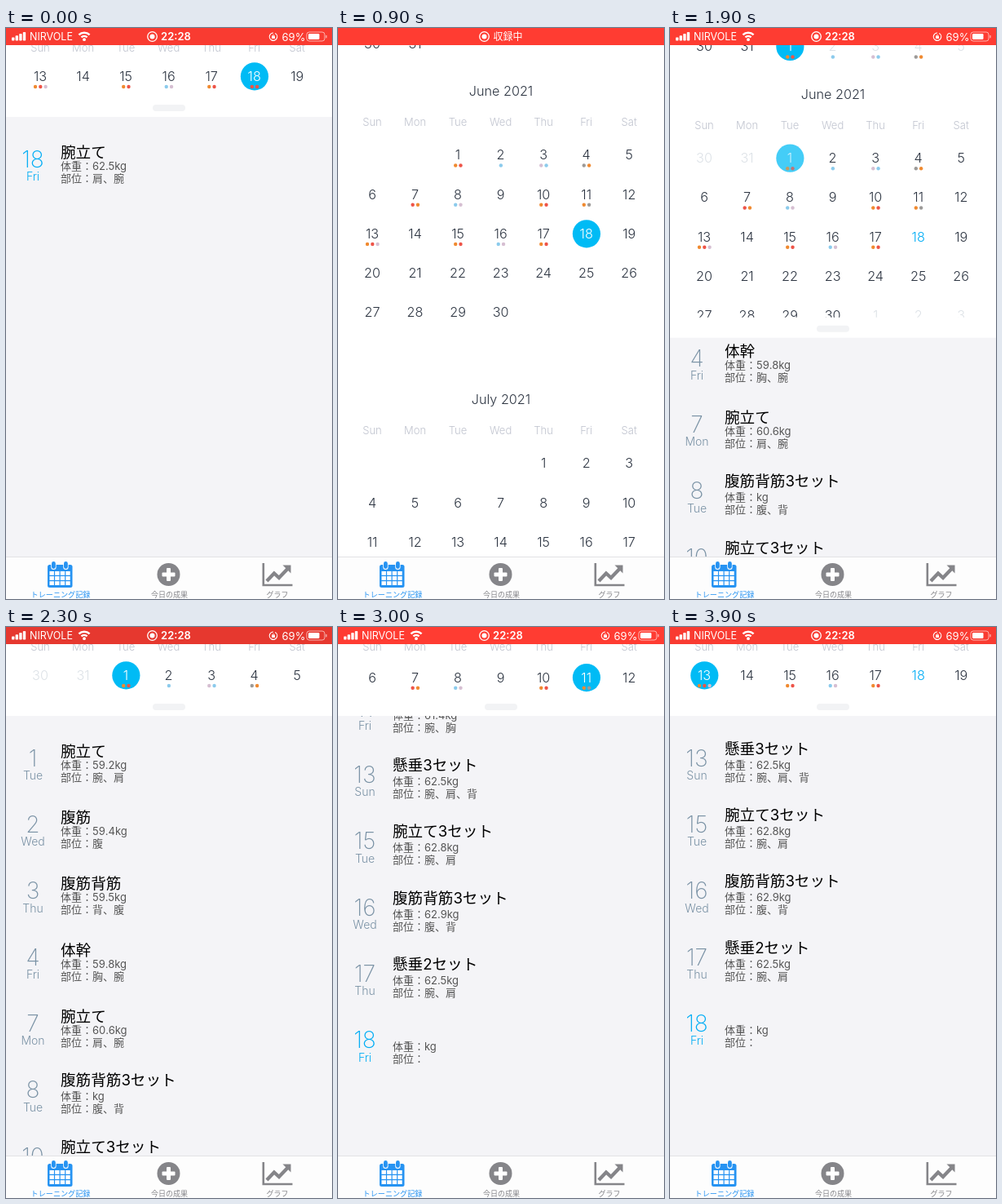
An HTML page with a canvas that plays this animation: 400x700 px, repeating every 4000 ms.

```html
<!DOCTYPE html>
<html lang="ja">
<head>
<meta charset="utf-8">
<style>
html, body { margin: 0; width: 400px; height: 700px; overflow: hidden; background: #fff; }
canvas { display: block; }
</style>
</head>
<body>
<canvas id="stage" width="400" height="700"></canvas>
<script>
const ctx = document.getElementById('stage').getContext('2d');
const FONT = 'Inter, "Noto Sans CJK JP", "Noto Sans CJK", sans-serif';
const LOOP = 4000, STEP = 100;
const INK = '#2d3542', FAINT = '#dde2e7', MUTED = '#c0c4cf', CYAN = '#00adf5', DISC = '#00bbf5', SLATE = '#7a92a5';
const ACTIVE = '#2693f2', IDLE = '#858589';
const OPEN = [200, 650], SCROLL = [900, 1387], CLOSE = [1700, 2090], LIST = [2319, 3087];
const SECOND_WEEK = [2763, 3043], THIRD_WEEK = [3130, 3410];
const PANEL_MIN = 109, PANEL_MAX = 673;
const ROW = 48.25, FIRST_ROW = 78.5, MONTH_HEIGHT = 378, ITEM = 81.33;
const WEEK = ['Sun', 'Mon', 'Tue', 'Wed', 'Thu', 'Fri', 'Sat'];
const DOT = { o: '#f08a30', r: '#ee5448', b: '#8ccbec', p: '#d6bfd2', g: '#9c9a98' };
const DOTS = { 1: 'or', 2: 'b', 3: 'pb', 4: 'go', 7: 'ro', 8: 'bp', 10: 'or', 11: 'og', 13: 'orp', 15: 'or', 16: 'bp', 17: 'or' };
const TODAY = [{ day: 18, title: '腕立て', weight: '62.5', parts: '肩、腕' }];
const ITEMS = [
  [1, '腕立て', '59.2', '腕、肩'], [2, '腹筋', '59.4', '腹'],
  [3, '腹筋背筋', '59.5', '背、腹'], [4, '体幹', '59.8', '胸、腕'],
  [7, '腕立て', '60.6', '肩、腕'], [8, '腹筋背筋3セット', '', '腹、背'],
  [10, '腕立て3セット', '61.6', '腕、肩'], [11, '体幹+腕立て', '61.4', '腕、胸'],
  [13, '懸垂3セット', '62.5', '腕、肩、背'], [15, '腕立て3セット', '62.8', '腕、肩'],
  [16, '腹筋背筋3セット', '62.9', '腹、背'], [17, '懸垂2セット', '62.5', '腕、肩'],
  [18, '', '', '']
].map(([day, title, weight, parts]) => ({ day, title, weight, parts }));

const clamp = v => Math.min(1, Math.max(0, v));
const mix = (a, b, p) => a + (b - a) * p;
const ease = (t, [from, to]) => (1 - Math.cos(Math.PI * clamp((t - from) / (to - from)))) / 2;
const columnX = c => 42 + c * 52.53;
const listScroll = t => ITEM * 8 * ease(t, LIST);

// y is the middle of the capital letters
function text(str, x, y, size, color, weight = 400, align = 'center') {
  ctx.font = `${weight} ${size}px ${FONT}`;
  ctx.textAlign = align;
  ctx.fillStyle = color;
  ctx.fillText(str, x, y + size * 0.364);
}
function rect(x, y, w, h, color, r = 0) {
  ctx.fillStyle = color;
  ctx.beginPath();
  ctx.roundRect(x, y, w, h, r);
  ctx.fill();
}
function disc(x, y, r, color) {
  ctx.fillStyle = color;
  ctx.beginPath();
  ctx.arc(x, y, r, 0, Math.PI * 2);
  ctx.fill();
}
function stroke(points, width, color) {
  ctx.strokeStyle = color;
  ctx.lineWidth = width;
  ctx.beginPath();
  points.forEach(([x, y]) => ctx.lineTo(x, y));
  ctx.stroke();
}
function arc(x, y, r, from, to, width) {
  ctx.strokeStyle = '#fff';
  ctx.lineWidth = width;
  ctx.beginPath();
  ctx.arc(x, y, r, from, to);
  ctx.stroke();
}
function clipped(y, bottom, draw) {
  ctx.save();
  ctx.beginPath();
  ctx.rect(0, y, 400, bottom - y);
  ctx.clip();
  draw();
  ctx.restore();
}

function drawItem({ day, title, weight, parts }, y) {
  const color = day === 18 ? CYAN : SLATE;
  text(day, 33, y - 8.5, 28, color, 200);
  text(WEEK[(day + 1) % 7], 33, y + 13, 14, color, 300);
  text(title, 67, y - (/[\d+]/.test(title) ? 20 : 17), 18.6, '#000', 400, 'left');
  text(`体重：${weight}kg`, 67, y, 13, '#555', 400, 'left');
  text(`部位：${parts}`, 67, y + 15, 13, '#555', 400, 'left');
}

function drawList(t) {
  const items = t < 800 ? TODAY : ITEMS;
  items.forEach((item, i) => {
    const y = 169 + i * ITEM - listScroll(t);
    if (y > 60 && y < 700) drawItem(item, y);
  });
}

function drawDay(date, shownMonth, x, y, t, selected) {
  const day = date.getDate(), june = date.getMonth() === 5;
  const extra = date.getMonth() !== shownMonth;
  const chosen = june && day === selected;
  let color = extra ? FAINT : INK;
  if (june && day === 18) color = CYAN;
  ctx.save();
  if (chosen && !extra && day === 1) ctx.globalAlpha = mix(0.2, 1, clamp((t - CLOSE[0]) / 300));
  if (chosen) {
    disc(x + 0.3, y + 0.3, 17.1, DISC);
    color = '#fff';
  }
  text(day, x, y, 16.2, color, 300);
  const dots = june ? (day === 18 && t < OPEN[1] ? 'rr' : DOTS[day] || '') : '';
  [...dots].forEach((key, i) => disc(x + 0.3 + (i - (dots.length - 1) / 2) * 6.3, y + 13, 2.2, DOT[key]));
  ctx.restore();
}

function drawMonth(month, top, t, selected) {
  const first = new Date(2021, month, 1);
  const lead = first.getDay(), length = new Date(2021, month + 1, 0).getDate();
  const name = first.toLocaleString('en-US', { month: 'long' });
  text(`${name} 2021`, 200, top, 16.2, INK, 300);
  WEEK.forEach((label, c) => text(label, columnX(c), top + 38.7, 13, MUTED, 300));
  const cells = Math.ceil((lead + length) / 7) * 7;
  for (let i = 0; i < cells; i++) {
    const date = new Date(2021, month, i - lead + 1);
    if (date.getMonth() !== month && t < CLOSE[0]) continue;
    drawDay(date, month, columnX(i % 7), top + FIRST_ROW + ROW * Math.floor(i / 7), t, selected);
  }
}

function drawCalendar(t) {
  const closing = t >= CLOSE[0];
  const open = closing ? 1 - ease(t, CLOSE) : ease(t, OPEN);
  const bottom = mix(PANEL_MIN, PANEL_MAX, open);
  const topItem = ITEMS[Math.floor(listScroll(t - 60) / ITEM + 0.01)];
  const selected = closing ? topItem.day : 18;
  const row = closing ? ease(t, SECOND_WEEK) + ease(t, THIRD_WEEK) : 2;
  const weekTop = 59 - FIRST_ROW - ROW * row;
  const top = mix(weekTop, mix(77, 189.5, ease(t, SCROLL)), open);

  rect(0, 21, 400, bottom - 21, '#fff');
  clipped(21, bottom - 25, () => {
    for (let month = 4; month <= 7; month++) drawMonth(month, top + (month - 5) * MONTH_HEIGHT, t, selected);
  });
  rect(180, bottom - 15, 40, 8, '#f2f3f5', 4);
  ctx.globalAlpha = clamp(1 - (bottom - PANEL_MIN) / 104);
  rect(0, 21, 400, 13, '#fff');
  clipped(21, 34, () => WEEK.forEach((label, c) => text(label, columnX(c), 24.5, 13, MUTED, 300)));
  ctx.globalAlpha = 1;
}

function drawStatus(t) {
  const glow = (1 + Math.cos((t - 900) / 1050 * Math.PI * 2)) / 2;
  rect(0, 0, 400, 21, `rgb(${mix(222, 255, glow)}, ${mix(54, 60, glow)}, ${mix(46, 50, glow)})`);
  arc(179.5, 10.5, 5.8, 0, Math.PI * 2, 1.3);
  disc(179.5, 10.5, 3, '#fff');
  if (t >= 600 && t < 1600) {
    text('収録中', 208.5, 10.7, 12, '#fff');
    return;
  }
  text('22:28', 208.5, 10.7, 13, '#fff', 600);
  for (let i = 0; i < 4; i++) rect(7 + i * 4.6, 11.5 - i * 2.2, 3.4, 4 + i * 2.2, '#fff', 0.8);
  text('NIRVOLE', 29, 10.8, 12.5, '#fff', 400, 'left');
  for (const r of [5, 9.3]) arc(96, 15, r, -Math.PI * 0.75, -Math.PI * 0.25, 2.5);
  disc(96, 14.2, 1.9, '#fff');
  arc(328, 10.7, 4.7, -Math.PI * 0.35, Math.PI * 1.5, 1.2);
  rect(326, 10, 4, 3, '#fff', 0.5);
  arc(328, 10, 1.3, Math.PI, 0, 0.9);
  text('69%', 353, 10.8, 13, '#fff');
  ctx.strokeStyle = 'rgba(255,255,255,.6)';
  ctx.lineWidth = 1;
  ctx.beginPath();
  ctx.roundRect(369, 5, 22, 11, 3);
  ctx.stroke();
  rect(371, 7, 13.5, 7, '#fff', 1.3);
  rect(392.3, 8.7, 1.4, 3.8, 'rgba(255,255,255,.6)', 0.7);
}

function drawTabs() {
  rect(0, 648, 400, 52, '#fdfdfd');
  rect(0, 648, 400, 1, '#e2e2e5');
  rect(51, 658, 30.5, 28, ACTIVE, 2.5);
  for (const x of [56, 71]) {
    rect(x - 0.8, 653.5, 6.4, 10.5, '#fdfdfd', 3);
    rect(x, 654, 4.8, 9, ACTIVE, 2.4);
  }
  for (let r = 0; r < 3; r++) {
    for (let c = 0; c < 4; c++) rect(53.5 + c * 6.6, 666 + r * 6.1, 5.4, 4.8, '#fff');
  }
  disc(199.5, 670, 14, IDLE);
  rect(191.5, 667.5, 16, 5, '#fff', 1);
  rect(197, 662, 5, 16, '#fff', 1);
  stroke([[315.8, 656], [315.8, 683], [351.5, 683]], 2.6, IDLE);
  stroke([[320, 678], [329, 668.5], [335, 674], [345.5, 663]], 4.3, IDLE);
  ctx.fillStyle = IDLE;
  ctx.beginPath();
  ctx.moveTo(339.5, 658.5);
  ctx.lineTo(349.5, 658.5);
  ctx.lineTo(349.5, 668.5);
  ctx.fill();
  text('トレーニング記録', 67, 695, 9.1, ACTIVE);
  text('今日の成果', 200.5, 695, 9, IDLE);
  text('グラフ', 333, 695, 9, IDLE);
}

function draw(t) {
  rect(0, 0, 400, 700, '#f4f4f7');
  drawList(t);
  drawCalendar(t);
  drawTabs();
  drawStatus(t);
}

const start = performance.now();
function tick() {
  const elapsed = (performance.now() - start) % LOOP;
  draw(Math.floor(elapsed / STEP) * STEP);
  requestAnimationFrame(tick);
}
tick();
</script>
</body>
</html>
```
